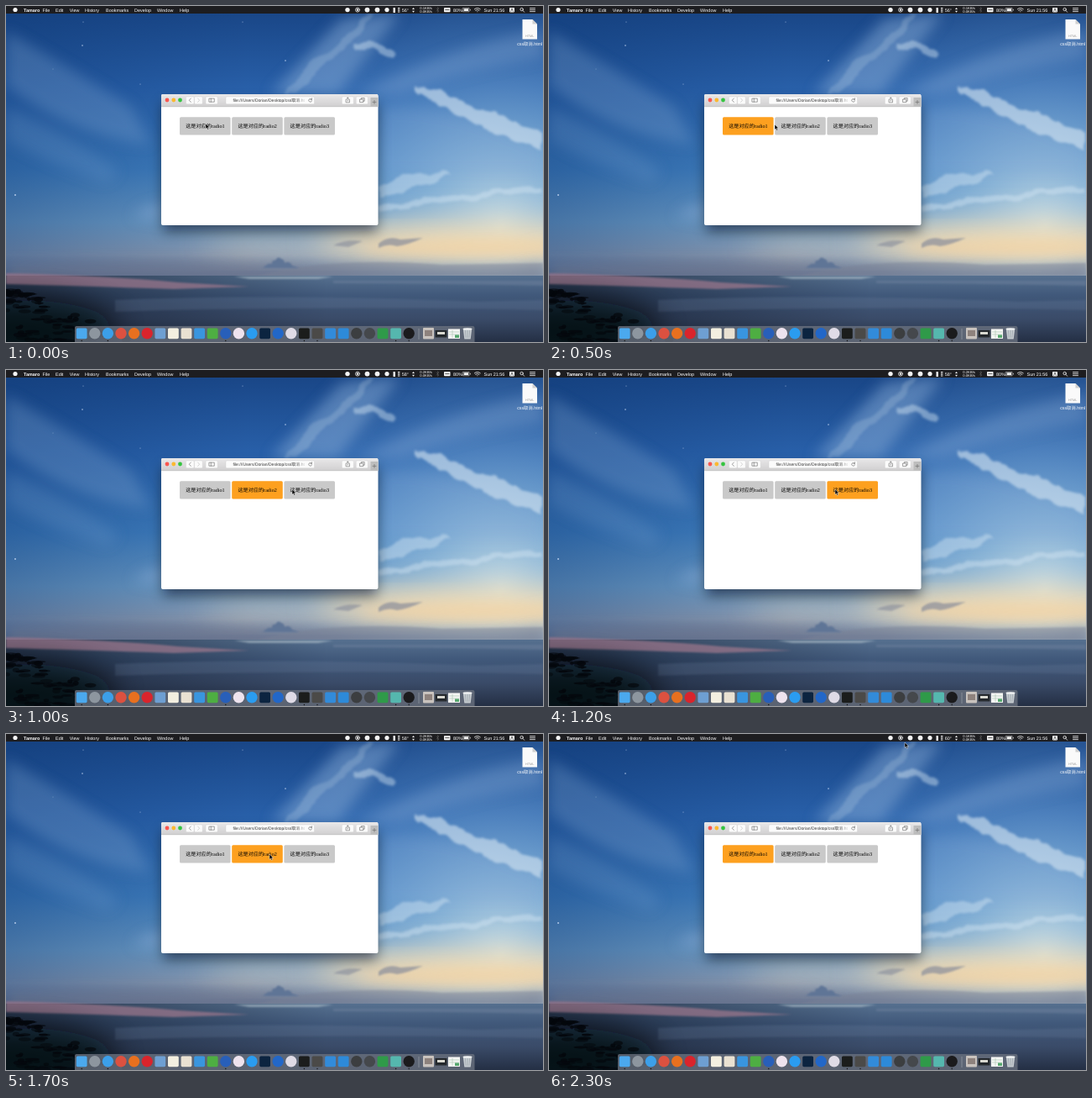
Write an HTML page that moves like this. It is 640 px wide and 400 px high and loops after 2.4 s.

```html
<!DOCTYPE html>
<html lang="en">
<head>
<meta charset="utf-8">
<title>Radio buttons on a desktop</title>
<style>
  html, body { margin: 0; width: 100%; height: 100%; overflow: hidden; background: #1d4f93; }
  svg { display: block; width: 640px; height: 400px; text-rendering: geometricPrecision; }
  text { font-family: "Liberation Sans", "Noto Sans CJK SC", "Noto Sans CJK", sans-serif; white-space: pre; }
  .menu { font-size: 5.45px; fill: #fff; }
  .label { font-family: "Liberation Serif", "Noto Sans CJK SC", "Noto Sans CJK", serif; font-size: 6.15px; fill: #000; }
  .line { fill: none; stroke-linecap: round; stroke-linejoin: round; }
</style>
</head>
<body>
<svg viewBox="0 0 640 400">
  <defs>
    <linearGradient id="sky" x2="0" y2="1">
      <stop offset="0" stop-color="#184484"/>
      <stop offset=".3" stop-color="#285fa8"/>
      <stop offset=".6" stop-color="#3f7dbd"/>
      <stop offset=".8" stop-color="#6e9cc4"/>
      <stop offset=".92" stop-color="#8b9ab0"/>
      <stop offset="1" stop-color="#5f7090"/>
    </linearGradient>
    <linearGradient id="sea" x2="0" y2="1">
      <stop offset="0" stop-color="#56708f"/>
      <stop offset=".3" stop-color="#40587a"/>
      <stop offset=".65" stop-color="#3a4b68"/>
      <stop offset="1" stop-color="#242f44"/>
    </linearGradient>
    <linearGradient id="shade">
      <stop offset="0" stop-color="#0e3975" stop-opacity=".4"/>
      <stop offset=".45" stop-color="#0e3975" stop-opacity="0"/>
    </linearGradient>
    <linearGradient id="dusk">
      <stop offset="0" stop-color="#0a1222" stop-opacity=".6"/>
      <stop offset=".6" stop-color="#0a1222" stop-opacity="0"/>
    </linearGradient>
    <radialGradient id="glow" gradientUnits="userSpaceOnUse" cx="590" cy="262" r="310">
      <stop offset="0" stop-color="#cbdfe6" stop-opacity=".9"/>
      <stop offset=".3" stop-color="#a3c8e2" stop-opacity=".62"/>
      <stop offset=".65" stop-color="#7fb0de" stop-opacity=".26"/>
      <stop offset="1" stop-color="#7fb0de" stop-opacity="0"/>
    </radialGradient>
    <linearGradient id="bar" x2="0" y2="1">
      <stop offset="0" stop-color="#e9e8e9"/>
      <stop offset="1" stop-color="#d0cfd0"/>
    </linearGradient>
    <linearGradient id="fade">
      <stop offset=".86" stop-color="#333"/>
      <stop offset="1" stop-color="#333" stop-opacity=".15"/>
    </linearGradient>
    <filter id="b1" x="-30%" y="-60%" width="160%" height="220%"><feGaussianBlur stdDeviation="1.3"/></filter>
    <filter id="b8" x="-50%" y="-100%" width="200%" height="300%"><feGaussianBlur stdDeviation="8"/></filter>
    <filter id="b18" x="-60%" y="-120%" width="220%" height="340%"><feGaussianBlur stdDeviation="18"/></filter>
    <filter id="wisp" x="-20%" y="-40%" width="140%" height="180%">
      <feTurbulence type="fractalNoise" baseFrequency=".035" numOctaves="3" seed="4"/>
      <feDisplacementMap in="SourceGraphic" scale="16" xChannelSelector="R" yChannelSelector="G"/>
      <feGaussianBlur stdDeviation="1.4"/>
    </filter>
    <clipPath id="air"><rect width="640" height="321"/></clipPath>
  </defs>

  <!-- wallpaper -->
  <g clip-path="url(#air)">
    <rect width="640" height="322" fill="url(#sky)"/>
    <rect width="640" height="322" fill="url(#shade)"/>
    <rect width="640" height="322" fill="url(#glow)"/>
    <ellipse cx="400" cy="284" rx="170" ry="9" fill="#ddd3bd" opacity=".8" filter="url(#b18)"/>
    <ellipse cx="560" cy="281" rx="190" ry="20" fill="#f8dfb4" filter="url(#b18)"/>
    <ellipse cx="570" cy="288" rx="150" ry="9" fill="#f6d3a0" opacity=".7" filter="url(#b8)"/>
    <path d="M0 308Q200 302 400 310T640 307V330H0Z" fill="#73798f" opacity=".6" filter="url(#b8)"/>
    <g fill="#86aad5" filter="url(#b8)">
      <path d="M0 30Q70 70 150 120L172 165Q80 155 0 95Z" opacity=".3"/>
      <path d="M0 120Q70 150 135 196L120 210Q55 190 0 160Z" opacity=".2"/>
      <path d="M150 252Q165 235 190 236V258Q166 250 150 252Z" opacity=".5"/>
      <path d="M315 105L400 15L470 9L395 105Z" opacity=".5"/>
      <path d="M420 105Q520 50 640 28V62Q540 76 470 105Z" opacity=".35"/>
      <path d="M445 120Q540 118 640 170V200H445Z" opacity=".25"/>
    </g>
    <g fill="#d3e4f1" filter="url(#wisp)">
      <path d="M486 96Q530 104 575 126L641 153V172Q600 158 571 146Q525 124 489 100Z" opacity=".62"/>
      <path d="M416 42Q438 42 464 56L460 62Q438 54 418 49Z" opacity=".45"/>
      <path d="M330 104Q370 62 432 14L440 14Q385 66 345 104Z" opacity=".2"/>
      <path d="M445 217Q470 200 505 197L530 203Q490 212 447 229Z" opacity=".45"/>
      <path d="M445 238Q540 222 640 214V220Q550 230 445 246Z" opacity=".45"/>
    </g>
    <g fill="#7b8296" filter="url(#b1)">
      <path d="M444 283Q455 273 470 278L497 276Q480 284 466 286Q455 282 444 288Z" opacity=".6"/>
      <path d="M390 285Q405 277 425 280L408 287Z" opacity=".5"/>
      <path d="M330 314Q410 300 520 308L640 306V321H300Z" opacity=".45"/>
    </g>
    <path d="M306 312Q312 306 317 307Q317 302 321 303Q324 297 328 301Q332 302 332 306Q338 303 341 309L350 312Z" fill="#5f7596" filter="url(#b1)"/>
  </g>
  <rect y="321" width="640" height="79" fill="url(#sea)"/>
  <rect y="321" width="640" height="79" fill="url(#dusk)"/>
  <g filter="url(#b1)">
    <path d="M0 318Q120 321 205 329L290 334L200 337Q80 333 0 331Z" fill="#a0798d" opacity=".7"/>
    <path d="M272 322H390L372 325H290Z" fill="#b8c8d1" opacity=".6"/>
    <path d="M390 327H640V333Q500 330 390 330Z" fill="#7c8da5" opacity=".35"/>
    <path d="M130 350Q330 342 560 352L640 350V362Q390 356 130 364Z" fill="#7286a3" opacity=".22"/>
  </g>
  <ellipse cx="20" cy="385" rx="110" ry="35" fill="#05080f" opacity=".8" filter="url(#b18)"/>
  <g id="rocks" fill="#04070c"></g>
  <g id="stars" fill="#dceaff"></g>

  <!-- menu bar -->
  <rect width="640" height="9" fill="#1d1d20"/>
  <circle cx="11" cy="4.5" r="2.6" fill="#f4f4f4"/>
  <g id="menu"></g>
  <g fill="#f4f4f4">
    <circle cx="407" cy="4.6" r="2.7"/>
    <circle cx="430.5" cy="4.6" r="2.9"/>
    <circle cx="442.5" cy="4.6" r="2.9"/>
    <circle cx="454" cy="4.6" r="2.6"/>
    <circle cx="419" cy="4.6" r="1.3"/>
    <rect x="461.5" y="2" width="2.4" height="6" rx=".5"/>
    <path d="M467 2h2.4v1.2H467zM467 4.2h2.4v1.2H467zM467 6.4h2.4v1.2H467z"/>
    <path d="M484 4l1.5-2 1.5 2zM484 5.7l1.5 2 1.5-2z"/>
    <rect x="522" y="2" width="7.5" height="5.2" rx=".8"/>
    <rect x="545.6" y="3.2" width="5.4" height="2.8"/>
    <rect x="552.8" y="3.8" width=".8" height="1.6"/>
    <rect x="600" y="2" width="6" height="5.4" rx=".8"/>
  </g>
  <g class="line" stroke="#f4f4f4" stroke-width=".8">
    <circle cx="419" cy="4.6" r="2.5"/>
    <path d="M544.8 2.4h7.2v4.4h-7.2z" stroke-width=".5"/>
    <path d="M558.3 3.8q3.5-2.8 7 0M559.6 5.2q2.2-1.8 4.4 0M561.7 6.7h.2"/>
    <circle cx="614.6" cy="4" r="1.7"/><path d="M616 5.4l1.6 1.8"/>
    <path d="M624.5 2.6h6M624.5 4.6h6M624.5 6.6h6"/>
    <path d="M513 3l3 3-1.5 1.4V1.6L516 3l-3 3" stroke="#666" stroke-width=".5"/>
  </g>
  <path d="M601.6 6.4l1.4-3.6 1.4 3.6" class="line" stroke="#222" stroke-width=".6"/>
  <path d="M523.3 4.6h5" stroke="#555" stroke-width="1"/>
  <text id="temp" class="menu" x="471.8" y="6.6"></text>
  <text id="up" class="menu" x="493.3" y="4.3" style="font-size:4.2px"></text>
  <text class="menu" x="493.3" y="8.1" style="font-size:4.2px">0.0KB/s</text>

  <!-- desktop file -->
  <path d="M615.5 16H627.5L633 21.5V39.5H615.5Z" fill="#fafafa"/>
  <path d="M627.5 16V21.5H633Z" fill="#cfcfcf"/>
  <text x="624.2" y="37" text-anchor="middle" font-size="3.8" fill="#999">HTML</text>
  <text x="624.2" y="46.6" text-anchor="middle" font-size="5.3" fill="#fff">css取消.html</text>

  <!-- browser window -->
  <rect x="187" y="116" width="255" height="152" fill="#001" opacity=".55" filter="url(#b8)"/>
  <rect x="185" y="105" width="258.5" height="156" rx="2" fill="#fff"/>
  <path d="M185 120V107Q185 105 187 105H441.5Q443.5 105 443.5 107V120Z" fill="url(#bar)"/>
  <path d="M185 119.8H443.5" stroke="#b4b4b4" stroke-width=".5"/>
  <circle cx="192" cy="112" r="2.4" fill="#f9564f"/>
  <circle cx="199.8" cy="112" r="2.4" fill="#fbb930"/>
  <circle cx="207.5" cy="112" r="2.4" fill="#35c440"/>
  <rect x="434.5" y="109" width="9" height="10.8" fill="#bdbdbd"/>
  <g id="tools" fill="#fbfbfb"></g>
  <g class="line" stroke="#666" stroke-width=".6">
    <path d="M220.3 110l-2 2.2 2 2.2"/>
    <path d="M228.6 110l2 2.2-2 2.2" stroke="#bbb"/>
    <path d="M242.3 110.2h6v4h-6zM244.3 110.2v4"/>
    <path d="M405.7 111.4h-.6v3.4h4.4v-3.4h-.6M407.3 113v-4M406 110.2l1.3-1.3 1.3 1.3"/>
    <path d="M422 111h3.8v3.6H422zM423.4 111v-1.4h3.8v3.6h-1.4"/>
    <path d="M439 112.4v4M437 114.4h4"/>
    <path d="M364.2 111.2a1.9 1.9 0 1 0 .3 1.6M364.5 109.8v1.6h-1.6"/>
  </g>
  <text x="270.5" y="114" font-size="5" fill="url(#fade)">file:///Users/Dorian/Desktop/css取消.ht</text>
  <g id="radios"></g>

  <!-- dock -->
  <path d="M82 400V383Q82 381 84 381H556Q558.5 381 558.5 383V400Z" fill="#69717f" opacity=".8"/>
  <path d="M492 384V397" stroke="#a2a8b0" stroke-width=".6"/>
  <g id="dock"></g>
  <rect x="497" y="383" width="13" height="13.5" rx="1" fill="#c9c3be"/>
  <rect x="499" y="386" width="9" height="7" fill="#8e827d"/>
  <rect x="511.5" y="386" width="14" height="8.5" fill="#24282c"/>
  <rect x="514" y="388" width="9" height="3" fill="#d8d8d0"/>
  <rect x="527" y="384.5" width="14" height="11.5" fill="#f5f6f4"/>
  <path d="M528 388h12M528 391h12M532 386v9" stroke="#a8c4b0" stroke-width=".6"/>
  <rect x="535" y="391.5" width="5" height="3.5" fill="#56a76e"/>
  <path d="M544.8 384.5H555.2L553.7 396.5H546.3Z" fill="#d3d8dc" opacity=".9"/>
  <path d="M547.3 386l.7 9M550 386v9M552.7 386l-.7 9" stroke="#8f989f" stroke-width=".6"/>
  <ellipse cx="550" cy="384.5" rx="5.5" ry="1.3" fill="#f0f2f3"/>

  <path id="cursor" d="M0 0V6.3L1.5 5L2.5 7.3L3.6 6.8L2.6 4.6H4.6Z" fill="#000" stroke="#fff" stroke-width=".45"/>
</svg>
<script>
const $ = id => document.getElementById(id);

function add(parent, tag, attrs, text) {
  const el = document.createElementNS("http://www.w3.org/2000/svg", tag);
  for (const key in attrs) el.setAttribute(key, attrs[key]);
  if (text) el.textContent = text;
  $(parent).append(el);
  return el;
}

// Small seeded generator for the shoreline
let seed = 17;
function rand() {
  seed = (seed * 16807) % 2147483647;
  return seed / 2147483647;
}

for (let i = 0; i < 90; i++) {
  const y = 339 + rand() * 61;
  const reach = 20 + (y - 338) * 2.2;
  add("rocks", "ellipse", {
    cx: rand() * reach, cy: y, rx: 2 + rand() * 8, ry: 1 + rand() * 2.2,
    opacity: 0.5 + rand() * 0.4
  });
}

for (const [cx, cy, r] of [[91, 47, .8], [92, 19, .5], [333, 65, .8], [11, 225, .9], [282, 19, .5], [160, 93, .5], [56, 75, .4]])
  add("stars", "circle", { cx, cy, r, opacity: .8 });

const menu = [[21, "Tamaro"], [43.5, "File"], [59, "Edit"], [75.7, "View"], [94, "History"],
  [119, "Bookmarks"], [153, "Develop"], [180, "Window"], [207, "Help"], [533, "80%"], [569.5, "Sun 21:56"]];
menu.forEach(([x, label], i) =>
  add("menu", "text", { x, y: 6.6, class: "menu", "font-weight": i ? 400 : 700 }, label));

for (const [x, width] of [[214.5, 9.6], [224.6, 9.6], [238, 14.2], [262, 105.5], [400.3, 14], [417.3, 14]])
  add("tools", "rect", { x, y: 108, width, height: 8.7, rx: 1.2, stroke: "#c4c4c4", "stroke-width": .3 });

const radios = [1, 2, 3].map((n, i) => {
  const x = 207 + i * 62.2;
  const box = add("radios", "rect", { x, y: 132.3, width: 60.6, height: 21.3, rx: 1.5 });
  add("radios", "text", { x: x + 7.2, y: 145.2, class: "label" }, "这是对应的radio" + n);
  return box;
});

// Leading "o" is a round icon, "s" a square one
const icons = ("s#4ba9ee o#8d969f o#3c9fe9 o#dc5140 o#e8701f o#d9242c s#6e9fd2 s#f3efe0 s#e9e1d2 " +
  "s#3995df s#4eae42 o#285fb9 o#eee3ee o#2a9cf0 s#0c2440 o#2267c8 o#dfdbe6 s#1b1d1c " +
  "s#4b4a48 s#328bda s#2d8ad9 o#3c3e40 o#45484c s#2f9a49 s#55b7ae o#1b1b1d").split(" ");
icons.forEach((icon, i) => {
  const cx = 90.2 + i * 15.6, fill = icon.slice(1);
  if (icon[0] === "o") add("dock", "circle", { cx, cy: 389.8, r: 6.7, fill });
  else add("dock", "rect", { x: cx - 6.4, y: 383.4, width: 12.8, height: 12.8, rx: 1.6, fill });
});
for (const i of [0, 2, 11, 17, 18, 24, 25])
  add("dock", "circle", { cx: 90.2 + i * 15.6, cy: 398.5, r: .7, fill: "#111" });

const LOOP = 2400, STEP = 100;
// time, x, y of the pointer tip
const path = [[0, 238, 140], [300, 240, 140], [500, 269, 141], [700, 302, 142], [800, 304, 142],
  [1000, 341, 142], [1300, 341, 142], [1500, 314, 143], [1800, 314, 143], [2000, 250, 141],
  [2100, 250, 141], [2300, 424, 10], [2400, 424, 10]];
// time and chosen radio
const picks = [[0, 0], [200, 1], [700, 2], [1200, 3], [1600, 2], [2000, 1]];
const stats = [[0, "56°", "0.1KB/s"], [800, "58°", "0.2KB/s"], [2200, "60°", "0.1KB/s"]];

const latest = (rows, t) => rows.filter(row => row[0] <= t).pop();

function pointer(t) {
  const i = path.findIndex(p => p[0] > t);
  const [t0, x0, y0] = path[i - 1], [t1, x1, y1] = path[i];
  const k = (t - t0) / (t1 - t0);
  return [x0 + (x1 - x0) * k, y0 + (y1 - y0) * k];
}

let shown = -1;
function draw(time) {
  const t = Math.floor((time % LOOP) / STEP) * STEP;
  if (t === shown) return;
  shown = t;
  const chosen = latest(picks, t)[1];
  radios.forEach((box, i) => box.setAttribute("fill", i + 1 === chosen ? "#fda01f" : "#c9c9c9"));
  const [, temp, up] = latest(stats, t);
  $("temp").textContent = temp;
  $("up").textContent = up;
  $("cursor").setAttribute("transform", `translate(${pointer(t)})`);
}

const start = performance.now();
function tick() {
  draw(performance.now() - start);
  requestAnimationFrame(tick);
}
tick();
</script>
</body>
</html>
```
